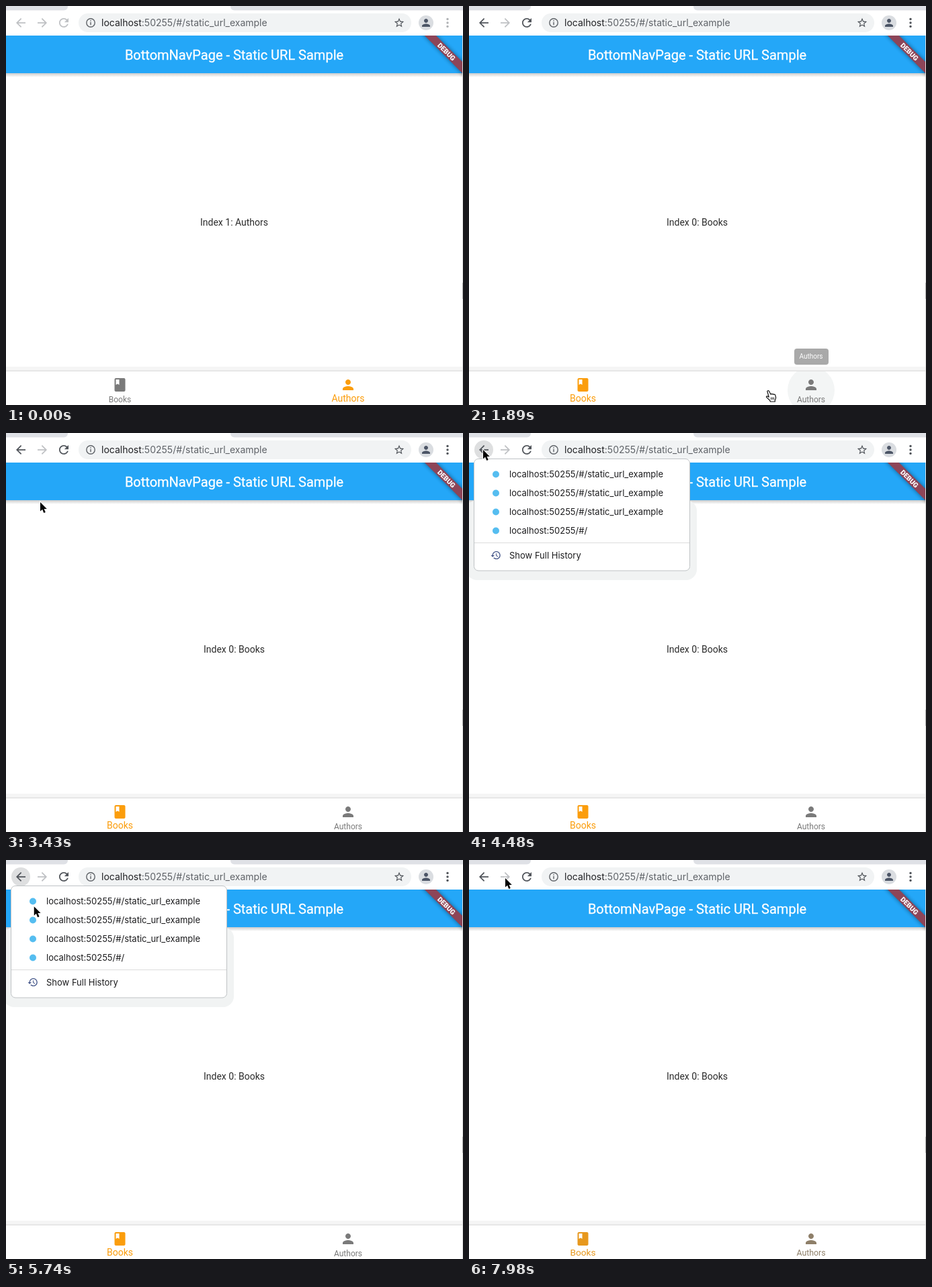
Recreate the animation shown at these times as an HTML page. Size 680 px wide and 594 px high, loop 8 s.

```html
<!DOCTYPE html>
<html lang="en">
<head>
<meta charset="utf-8">
<title>Bottom navigation with a static URL</title>
<style>
  html, body { margin: 0; width: 100%; height: 100%; overflow: hidden; background: #fff; }
  svg { display: block; width: 100%; height: 100%; font-family: Roboto, sans-serif; }
  .ui { font-family: Inter, sans-serif; }
  .mid { text-anchor: middle; }
</style>
</head>
<body>
<svg viewBox="0 0 680 594">
  <defs>
    <path id="arrow" d="M20 11H7.83l5.59-5.59L12 4l-8 8 8 8 1.41-1.41L7.83 13H20z"/>
    <path id="person" d="M12 12c2.21 0 4-1.79 4-4s-1.79-4-4-4-4 1.79-4 4 1.79 4 4 4zm0 2c-2.67 0-8 1.34-8 4v2h16v-2c0-2.66-5.33-4-8-4z"/>
    <linearGradient id="shade" x2="0" y2="1">
      <stop stop-color="#000" stop-opacity=".2"/><stop offset="1" stop-color="#000" stop-opacity="0"/>
    </linearGradient>
    <filter id="blur" x="-30%" y="-100%" width="160%" height="300%"><feGaussianBlur stdDeviation="3"/></filter>
    <clipPath id="page"><rect y="44" width="679" height="550"/></clipPath>
    <clipPath id="navClip"><rect y="544" width="680" height="50"/></clipPath>
  </defs>
  <rect width="680" height="594" fill="#fff"/>

  <!-- Browser chrome -->
  <path d="M0 0H92Q92 6 86 6.500H0zM334 0H680V6.500H340Q334 6 334 0z" fill="#dfe1e6"/>
  <circle id="backHover" cx="22" cy="25" r="14" fill="#dedfe0"/>
  <circle id="forwardHover" cx="54" cy="25" r="14" fill="#e6e7e8"/>
  <use id="back" href="#arrow" transform="translate(22 25) scale(.875) translate(-12 -12)"/>
  <use id="forward" href="#arrow" transform="translate(54 25) scale(-.875 .875) translate(-12 -12)"/>
  <path id="reload" transform="translate(86 25) scale(.875) translate(-12 -12)" d="M17.65 6.35C16.2 4.9 14.21 4 12 4c-4.42 0-7.99 3.58-7.99 8s3.57 8 7.99 8c3.73 0 6.84-2.55 7.73-6h-2.08c-.82 2.33-3.04 4-5.65 4-3.31 0-6-2.69-6-6s2.69-6 6-6c1.66 0 3.14.69 4.22 1.78L13 11h7V4z"/>
  <rect x="108" y="11" width="495" height="28" rx="14" fill="#f1f3f4"/>
  <g fill="none" stroke="#5f6368" stroke-width="1.4">
    <circle cx="126" cy="25" r="6.2"/><path d="M126 24v4.300M126 21.300v1.500"/>
  </g>
  <text class="ui" x="142" y="30" font-size="14" fill="#5f6368"><tspan fill="#202124">localhost</tspan>:50255/#/static_url_example</text>
  <path transform="translate(585 25) scale(.72) translate(-12 -12)" fill="#50545a" d="M22 9.24l-7.19-.62L12 2 9.19 8.63 2 9.24l5.46 4.73L5.82 21 12 17.27 18.18 21l-1.63-7.03zM12 15.4l-3.76 2.27 1-4.28-3.32-2.88 4.38-.38L12 6.1l1.71 4.04 4.38.38-3.32 2.88 1 4.28z"/>
  <circle cx="625" cy="25" r="11" fill="#dadde1"/>
  <use href="#person" transform="translate(625 25) scale(.75) translate(-12 -12)" fill="#4c5566"/>
  <g id="dots"><circle cx="657" cy="19.500" r="1.700"/><circle cx="657" cy="25" r="1.700"/><circle cx="657" cy="30.500" r="1.700"/></g>

  <!-- App bar -->
  <rect y="100" width="679" height="6" fill="url(#shade)"/>
  <rect y="44" width="679" height="56" fill="#24a7f8"/>
  <text class="mid" x="339.500" y="79.500" font-size="20" fill="#fff" stroke="#fff" stroke-width=".3">BottomNavPage - Static URL Sample</text>
  <g clip-path="url(#page)">
    <g transform="translate(679.500 44) rotate(45)">
      <rect x="-46" y="28" width="92" height="12" opacity=".45" filter="url(#blur)"/>
      <rect x="-46" y="28" width="92" height="12" fill="#8d4558"/>
      <text class="mid" y="37.700" font-size="10.200" font-weight="900" fill="#fff">DEBUG</text>
    </g>
  </g>
  <text id="body" class="mid" x="339.500" y="327" font-size="14" fill="#2b2b2b"></text>

  <!-- Bottom navigation -->
  <rect y="537" width="679" height="6" fill="#f5f5f5"/>
  <rect y="542.500" width="679" height="1.500" fill="#e2e2e2"/>
  <g clip-path="url(#navClip)">
    <circle id="booksHover" cx="169.500" cy="572" r="35" fill="#f3f5f5"/>
    <circle id="authorsHover" cx="509" cy="572" r="35" fill="#f3f5f5"/>
    <circle id="ripple" cx="169.500" cy="572"/>
  </g>
  <g id="books">
    <path transform="translate(157.500 552)" d="M18 2H6c-1.1 0-2 .9-2 2v16c0 1.1.9 2 2 2h12c1.1 0 2-.9 2-2V4c0-1.1-.9-2-2-2zM6 4h5v8l-2.500-1.500L6 12z"/>
    <text class="mid" x="169.500">Books</text>
  </g>
  <g id="authors">
    <use href="#person" transform="translate(497 552)"/>
    <text class="mid" x="509">Authors</text>
  </g>
  <g id="tooltip">
    <rect x="484" y="510" width="51" height="24" rx="4" fill="#616161" opacity=".9"/>
    <text class="mid" x="509" y="525.300" font-size="10" fill="#fff">Authors</text>
  </g>
  <path d="M679.500 44V594" stroke="#d9d9d9"/>
  <path d="M679.500 412V436" stroke="#aaa"/>

  <!-- History menu -->
  <g id="menu" class="ui" font-size="13" fill="#1c1c1e">
    <rect x="-4" y="100" width="343" height="119" rx="16" fill="#f1f3f3"/>
    <rect x="7.500" y="38.500" width="321" height="166.500" rx="6.500" fill="#fff" stroke="#bfc3c5"/>
    <path d="M8 163.500H328" stroke="#dcdcdc"/>
    <g id="entries"></g>
    <path transform="translate(40 182) scale(.68) translate(-12 -12)" fill="#45578a" d="M13 3c-4.97 0-9 4.03-9 9H1l3.89 3.89.07.14L9 12H6c0-3.87 3.13-7 7-7s7 3.13 7 7-3.13 7-7 7c-1.93 0-3.68-.79-4.94-2.06l-1.42 1.42C8.27 19.99 10.51 21 13 21c4.97 0 9-4.03 9-9s-4.03-9-9-9zm-1 5v5l4.28 2.54.72-1.21-3.5-2.08V8z"/>
    <text x="60" y="187">Show Full History</text>
  </g>

  <!-- Pointers -->
  <path id="pointer" d="M0 0V13.500L3.100 10.700 5.300 16 7.800 15 5.600 9.900H9.800z" stroke="#fff" paint-order="stroke" stroke-width="1.800"/>
  <g id="hand" stroke="#111" stroke-width="1.200" stroke-linejoin="round">
    <path fill="#fff" d="M2 1.500Q3.500-.5 4.800 1.500L7 6Q8 4.800 9.300 6 10.500 5 11.700 6.400 13.300 5.600 14 7.400L14.800 11Q14.800 13 13.500 14.500V17H6.500L6 15.200 1 10.600Q0 9 2 8.800L4.400 10.200z"/>
    <path d="M7.800 10.500v3.500M9.800 10.500v3.500M11.800 10.500v3.500" stroke-width=".9"/>
  </g>
</svg>
<script>
const $ = id => document.getElementById(id);
const LOOP = 8000, STEP = 70;
const CLICK_BOOKS = 420, ENTER_AUTHORS = 1800, LEAVE_AUTHORS = 2295;
const MENU_OPEN = 4400, GO_BACK = 5900, GO_FORWARD = 7830;

// time, x, y of the pointer tip
const path = [
  [70, -14, 575], [280, 172, 572], [1050, 172, 572], [1120, 182, 572], [1520, 182, 572],
  [2080, 542, 572], [2150, 542, 572], [3000, 90, 190], [3430, 51, 103], [3950, 21, 25],
  [4690, 21, 25], [5460, 40, 105], [5820, 42, 64], [5980, 42, 64], [6370, 41, 74],
  [6930, 54, 27], [LOOP, 54, 27]
];

const clamp = v => Math.max(0, Math.min(1, v));
const ramp = (t, start, length) => clamp((t - start) / length);
const smooth = u => u * u * (3 - 2 * u);
const between = (t, a, b) => t >= a && t < b;
const show = (id, opacity) => $(id).setAttribute('opacity', +opacity);
const mix = (a, b, u) => `rgb(${a.map((v, i) => Math.round(v + (b[i] - v) * u))})`;

const site = 'localhost:50255/#/';
$('entries').innerHTML = ['static_url_example', 'static_url_example', 'static_url_example', '']
  .map((page, i) => `<circle cx="40" cy="${61.5 + 28 * i}" r="5" fill="#55bdf0"/>
    <text x="60" y="${66 + 28 * i}">${site}${page}</text>`).join('');

function pointerAt(t) {
  if (t < path[0][0]) return [-50, 0];
  const i = path.findIndex(key => key[0] > t);
  const [t0, x0, y0] = path[i - 1], [t1, x1, y1] = path[i];
  const u = smooth(ramp(t, t0, t1 - t0));
  return [x0 + (x1 - x0) * u, y0 + (y1 - y0) * u];
}

function drawTab(id, selected) {
  const tab = $(id), label = tab.querySelector('text');
  tab.setAttribute('fill', mix([122, 122, 122], [251, 157, 12], selected));
  label.setAttribute('font-size', 12 + 2 * selected);
  label.setAttribute('y', 589.5 - .5 * selected);
}

function draw(t) {
  const active = t >= CLICK_BOOKS;
  const onBooks = between(t, CLICK_BOOKS, GO_BACK) || t >= GO_FORWARD;
  const canForward = between(t, GO_BACK, GO_FORWARD);
  const dark = '#50545a', pale = '#bfc1c4';

  $('back').setAttribute('fill', active ? dark : pale);
  $('reload').setAttribute('fill', active ? dark : pale);
  $('dots').setAttribute('fill', active ? dark : '#b0b2b5');
  $('forward').setAttribute('fill', canForward ? dark : pale);
  show('backHover', between(t, 3920, GO_BACK));
  show('forwardHover', between(t, 6860, GO_FORWARD));
  show('menu', between(t, MENU_OPEN, GO_BACK));

  $('body').textContent = onBooks ? 'Index 0: Books' : 'Index 1: Authors';
  const selected = smooth(ramp(t, CLICK_BOOKS, 200)) - smooth(ramp(t, GO_BACK, 200))
    + smooth(ramp(t, GO_FORWARD, 200));
  drawTab('books', selected);
  drawTab('authors', 1 - selected);

  show('booksHover', ramp(t, CLICK_BOOKS, 50) - ramp(t, ENTER_AUTHORS, 50));
  show('authorsHover', ramp(t, ENTER_AUTHORS, 50) - ramp(t, LEAVE_AUTHORS, 50));
  show('tooltip', ramp(t, ENTER_AUTHORS, 150) - ramp(t, LEAVE_AUTHORS + 100, 75));
  $('ripple').setAttribute('r', 35 * smooth(ramp(t, CLICK_BOOKS, 225)));
  show('ripple', active ? .08 * (1 - ramp(t, 600, 240)) : 0);

  const [x, y] = pointerAt(t), overTab = active && y > 543;
  $('pointer').setAttribute('transform', `translate(${x} ${y})`);
  $('hand').setAttribute('transform', `translate(${x - 4} ${y})`);
  show('pointer', !overTab);
  show('hand', overTab);
}

const start = performance.now();
function frame() {
  const t = (performance.now() - start) % LOOP;
  draw(Math.floor(t / STEP) * STEP);
  requestAnimationFrame(frame);
}
frame();
</script>
</body>
</html>
```
